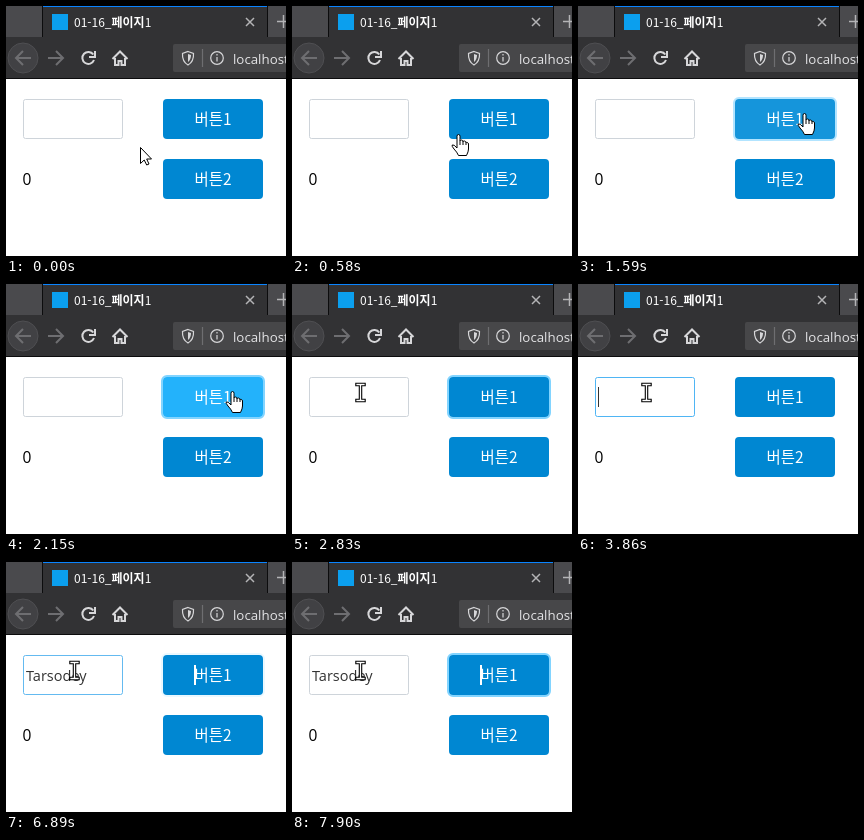
These frames come from a looping animation (280x250 px, 8 s). An HTML page:

```html
<!DOCTYPE html>
<html lang="ko">
<head>
<meta charset="utf-8">
<style>
  html, body { margin: 0; width: 100%; height: 100%; overflow: hidden; background: #fff; }
  svg { display: block; }
  text { font-family: "Open Sans", "Noto Sans", sans-serif; white-space: pre; }
  .ko { font-family: "Noto Sans CJK KR", "Noto Sans CJK", "Noto Sans CJK JP", sans-serif; fill: #fff; }
  .label { font-size: 15.5px; font-weight: 500; }
  .icon { fill: none; stroke: #d7d7d9; stroke-width: 2; }
  .soft { stroke: #b4b4b6; stroke-width: 1.5; }
  .dim { stroke: #6e6e71; }
  .thin { stroke-width: 1.2; }
  .outline { fill: #fff; stroke: #000; stroke-linejoin: round; }
  .beam { fill: none; stroke-linecap: square; }
</style>
</head>
<body>
<svg width="280" height="250" viewBox="0 0 280 250">
  <!-- tab strip -->
  <rect width="280" height="31" fill="#4a4a4d"/>
  <rect y="31" width="280" height="41" fill="#323234"/>
  <rect y="72" width="280" height="1" fill="#0c0c0d"/>
  <rect x="36" width="226" height="31" fill="#0c0c0d"/>
  <rect x="37" width="224" height="32" fill="#323234"/>
  <rect x="37" width="224" height="1" fill="#0a84ff"/>
  <rect x="46" y="8" width="16" height="16" fill="#0b9fee"/>
  <text class="ko" x="68" y="21" font-size="12">01-16_<tspan font-weight="bold">페이지</tspan>1</text>
  <path class="icon soft" d="M240 12l8 8m0-8l-8 8"/>
  <path class="icon soft" d="M271 15.5h14M277.5 9v13"/>

  <!-- toolbar -->
  <circle cx="17" cy="52" r="15" fill="#414144" stroke="#4f4f52"/>
  <path class="icon dim" d="M25 52H10m7-7l-7 7 7 7M42 52h15m-7-7l7 7-7 7"/>
  <path class="icon" d="M87.3 48.5A6 6 0 1 0 88 54M89 45v6h-6"/>
  <path class="icon" d="M106.5 53l7.5-7.5 7.5 7.5M109 52v7h3.5v-4h3v4h3.5v-7"/>
  <rect x="167" y="38" width="120" height="28" rx="2" fill="#474749"/>
  <path class="icon thin" d="M182 45.5l5.5 2q.5 8-5.5 11.5-6-3.5-5.5-11.5z"/>
  <path d="M182 48l3 1q0 4.5-3 7z" fill="#d7d7d9"/>
  <path class="icon dim thin" d="M196.5 43v18"/>
  <circle class="icon thin" cx="211" cy="52" r="6.3"/>
  <path class="icon thin" d="M211 51v4.5m0-7.5v1.5"/>
  <text x="227" y="58" font-size="13.3" fill="#e4e4e6">localhost</text>

  <!-- page -->
  <rect id="field" x="17.5" y="93.5" width="99" height="39" rx="2" fill="#fff"/>
  <text id="typed" x="20" y="119" font-size="14.5" fill="#333"></text>
  <text x="16.5" y="179" font-size="15.5">0</text>
  <rect id="ring" x="156" y="92" width="102" height="42" rx="5" fill="none" stroke="#82d4ff" stroke-width="2"/>
  <rect id="button" x="157" y="93" width="100" height="40" rx="4"/>
  <rect x="157" y="153" width="100" height="40" rx="4" fill="#0087d2"/>
  <text class="ko label" x="188.5" y="119">버튼1</text>
  <text class="ko label" x="188.5" y="179">버튼2</text>
  <rect id="caret" y="103" height="20"/>

  <g id="pointer">
    <path id="arrow" class="outline" d="M.5.5V16.5L4.2 13 6.7 18 9 17 6.7 12H11.5Z"/>
    <g id="hand" transform="translate(-7 -1)">
      <path class="outline" d="M6 14V2.2Q6 .5 7.5 .5T9 2.2V7Q9 6 10.5 6T12 7.8Q12 6.8 13.5 7T15 8.8Q15.2 8 16.3 8.4T17.5 10V15Q17.5 17.5 15.5 21.5H7.5Q6 18 3 15Q.5 12 1.2 11Q2.7 10 6 14Z"/>
      <path stroke="#000" d="M9 7v4M12 7.5V11M15 8.5V11"/>
    </g>
    <g id="ibeam">
      <path class="beam" stroke="#000" stroke-width="3.5" d="M-3-7.5H4M-3 8.5H4M.5-7.5V8.5"/>
      <path class="beam" stroke="#fff" stroke-width="1.3" d="M-3-7.5H4M-3 8.5H4M.5-7.5V8.5"/>
    </g>
  </g>
</svg>
<script>
const LOOP = 8000, WORD = 'Tarsodey';
const KEYS = [4790, 4940, 5260, 5410, 5490, 5640, 5810, 6040];
const BASE = [0, 135, 210], HOVER = [43, 185, 255], PRESS = [2, 119, 189], OVER = [35, 178, 251];
const GREY = [206, 212, 218], BLUE = [79, 181, 244];

const FILL = [[0, BASE], [580, BASE], [810, HOVER], [1510, HOVER], [1660, PRESS],
  [2050, PRESS], [2150, OVER], [2520, OVER], [2750, BASE]];
const BORDER = [[0, GREY], [3360, GREY], [3450, BLUE], [6860, BLUE], [7050, GREY]];
const RING = [[0, [0]], [1480, [0]], [1660, [1]], [3350, [1]], [3450, [0]], [6860, [0]], [7050, [1]]];

const el = id => document.getElementById(id);
const set = (id, attrs) => { for (const k in attrs) el(id).setAttribute(k, attrs[k]); };
const rgb = c => `rgb(${c.map(Math.round)})`;
const between = (t, a, b) => t >= a && t < b;

function track(keys, t) {
  const i = keys.findIndex(k => k[0] > t);
  if (i < 0) return keys[keys.length - 1][1];
  const [t0, a] = keys[i - 1], [t1, b] = keys[i];
  return a.map((v, j) => v + (b[j] - v) * (t - t0) / (t1 - t0));
}

// Eased progress that advances in n equal jumps, the first at t0 and the last at t1.
function jumps(t, t0, t1, n) {
  const k = Math.floor((t - t0) / (t1 - t0) * (n - 1) + 1e-6) + 1;
  const p = Math.min(1, Math.max(0, k / n));
  return p * p * (3 - 2 * p);
}

function drawPointer(t) {
  const go = jumps(t, 500, 810, 5), back = jumps(t, 2450, 2830, 6);
  const x = Math.round(134 + 92 * go - 158 * back), y = Math.round(141 - 33 * go);
  const kind = x >= 157 && y < 133 ? 'hand' : x < 117 ? 'ibeam' : 'arrow';
  set('pointer', { transform: `translate(${x} ${y})` });
  for (const id of ['arrow', 'hand', 'ibeam']) el(id).style.display = id === kind ? '' : 'none';
}

function drawTyping(t) {
  const n = KEYS.filter(k => k <= t).length;
  const typed = el('typed'), text = WORD.slice(0, n);
  if (typed.textContent !== text) typed.textContent = text;
  const onButton = t >= 6890;
  const visible = between(t, 3380, 3930) || between(t, 4410, 6590) ||
    between(t, 6890, 7370) || t >= 7900;
  const end = n ? Math.floor(20 + typed.getComputedTextLength()) : 20;
  set('caret', {
    x: onButton ? 188 : end,
    width: onButton ? 2 : 1,
    fill: onButton ? '#fff' : '#333',
    opacity: +visible
  });
}

function draw(now) {
  const t = now % LOOP;
  set('button', { fill: rgb(track(FILL, t)) });
  set('field', { stroke: rgb(track(BORDER, t)) });
  set('ring', { opacity: track(RING, t)[0] });
  drawPointer(t);
  drawTyping(t);
}

const start = performance.now();
function tick() {
  draw(performance.now() - start);
  requestAnimationFrame(tick);
}
tick();
</script>
</body>
</html>
```
